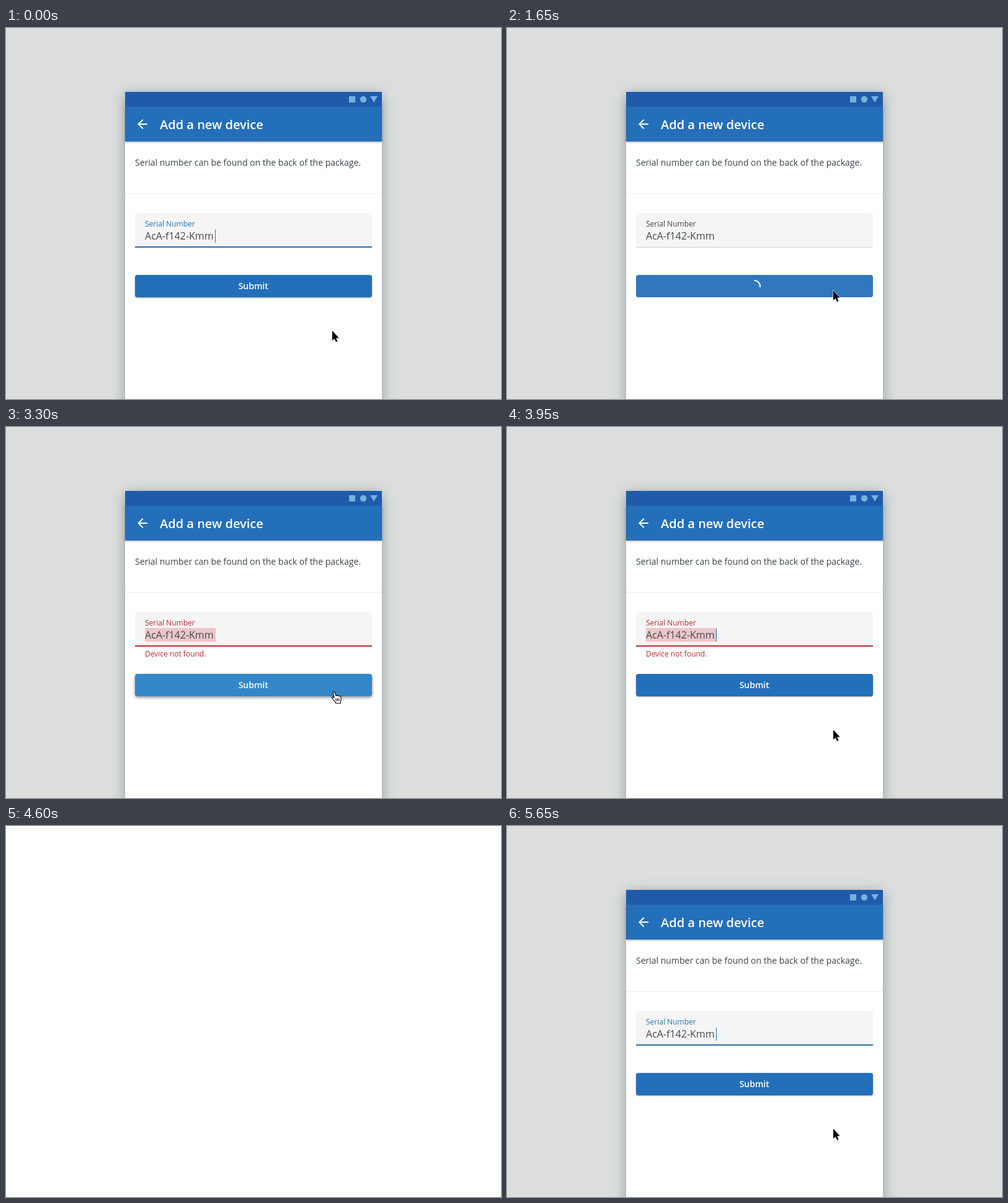
Animation, 798 px wide and 598 px high, one loop 5.7 s. Source, as an HTML page with a canvas:

```html
<!DOCTYPE html>
<html lang="en">
<head>
<meta charset="utf-8">
<title>Add a new device</title>
<style>
  html, body { margin: 0; width: 100%; height: 100%; overflow: hidden; background: #fff; }
  canvas { display: block; width: 798px; height: 598px; }
</style>
</head>
<body>
<canvas id="stage" width="798" height="598"></canvas>
<script>
const W = 798, H = 598, LOOP = 5700, STEP = 50;
const ctx = document.getElementById('stage').getContext('2d');

const BLUE = '#246fba', RED = '#bd2a30', INK = '#3b4449';
const BUSY_FROM = 1300, BUSY_TO = 2900;
const ICON_BACK = new Path2D('M20 11H7.83l5.59-5.59L12 4l-8 8 8 8 1.41-1.41L7.83 13H20z');
const ARROW = new Path2D('M0 0V16L3.6 12.7 6 18.3 8.5 17.2 6.2 11.8 10.6 11.4Z');
const HAND = new Path2D('M3.2 2.2C2.9.7 5.2 0 5.9 1.6L7.6 7.2C8 6 10 6.1 10.3 7.4' +
  'C10.9 6.4 12.6 6.7 12.9 8C13.7 7.3 15.3 7.9 15.5 9.2C16.2 11.6 16.2 13.3 15.3 15.4' +
  'L14.8 19.2H7.2L6.7 17.5C5 15.6 3.9 14.3 2.6 12.4C1.8 11.2.5 10.6.9 9.6' +
  'C1.6 8.4 3.3 9 4.7 10.6Z');

const clamp = x => Math.min(1, Math.max(0, x));
const ramp = (t, a, b) => clamp((t - a) / (b - a));
const smooth = x => x * x * (3 - 2 * x);
const ease = (t, a, b) => smooth(ramp(t, a, b));
const mix = (a, b, k) => a + (b - a) * k;
const mixRgb = (a, b, k) => `rgb(${a.map((v, i) => Math.round(mix(v, b[i], k)))})`;

function box(x, y, w, h, fill, radius = 0) {
  ctx.fillStyle = fill;
  ctx.beginPath();
  ctx.roundRect(x, y, w, h, radius);
  ctx.fill();
}

function text(str, x, y, size, fill, weight = 400, align = 'left') {
  ctx.font = `${weight} ${size}px "Open Sans", sans-serif`;
  ctx.textAlign = align;
  ctx.fillStyle = fill;
  ctx.fillText(str, x, y);
}

function withShadow(color, blur, dy, draw) {
  ctx.save();
  ctx.shadowColor = color;
  ctx.shadowBlur = blur;
  ctx.shadowOffsetY = dy;
  draw();
  ctx.restore();
}

function drawCard() {
  box(0, 0, W, H, '#dddfde');
  withShadow('rgba(60,85,95,.5)', 20, 4, () => box(192, 103, 414, 540, '#fff'));
  withShadow('rgba(0,0,0,.35)', 3, 1, () => box(192, 127, 414, 56, BLUE));
  ctx.save();
  ctx.beginPath();
  ctx.rect(192, 103, 414, 495);
  ctx.clip();
  box(192, 103, 414, 24, '#205bab');
  ctx.restore();

  box(553, 110, 10, 10, '#73b3de');
  ctx.beginPath();
  ctx.arc(576, 115, 5.2, 0, 7);
  ctx.moveTo(587, 110);
  ctx.lineTo(599, 110);
  ctx.lineTo(593, 120);
  ctx.fill();

  ctx.save();
  ctx.translate(208, 143);
  ctx.fillStyle = '#fff';
  ctx.fill(ICON_BACK);
  ctx.restore();

  text('Add a new device', 248, 163, 20, '#fff', 600);
  text('Serial number can be found on the back of the package.', 208, 222, 14, INK);
  box(192, 266, 414, 1, '#ececec');
}

function drawField(t, busy, failed) {
  const accent = failed ? RED : '#1b77b8';
  box(208, 298, 382, 56, '#f5f5f5', [4, 4, 0, 0]);
  if (busy) box(208, 353, 382, 1, '#cfd1d2');
  else box(208, 352, 382, 2, failed ? RED : BLUE);

  if (failed) box(224, 324, 114, 22, '#ebc7c9');
  text('Serial Number', 224, 320, 12, busy ? INK : accent);
  text('AcA-f142-Kmm', 224, 341, 16, '#434a4f');
  if (failed) text('Device not found.', 224, 370, 12, RED);

  const blinkOn = (t + 450) % 1000 < 500 || t >= 5000;
  if (!busy && blinkOn) box(337, 325, 1, 21, '#1b77b8');
}

function drawSpinner(t) {
  const p = ((t - 1360) / 1440 + 1) % 1;
  const grow = smooth(clamp(p * 2)), slide = smooth(clamp(p * 2 - 1));
  const start = 15 * grow + 110 * slide;
  const end = Math.min(126, start + 1 + 99 * grow);
  const angle = u => Math.PI + (p + u / 126) * Math.PI * 2;
  ctx.strokeStyle = '#fff';
  ctx.lineWidth = 2;
  ctx.beginPath();
  ctx.arc(399, 416, 9, angle(start), angle(end));
  ctx.stroke();
}

function drawButton(t, busy) {
  const hover = t < 2000
    ? ease(t, 480, 630) - ease(t, 1200, 1350)
    : ease(t, 2900, 3050) - ease(t, 3350, 3500);
  const fill = mixRgb([36, 111, 186], [51, 135, 200], hover);
  const paint = () => box(208, 398, 382, 36, fill, 4);
  if (busy) paint();
  else withShadow(`rgba(0,0,0,${mix(.4, .45, hover)})`, mix(2, 5, hover), mix(1, 2, hover), paint);

  const ripple = ease(t, 1150, 1500);
  const rippleAlpha = .16 * (1 - ramp(t, 1400, 1800));
  if (ripple > 0 && rippleAlpha > 0) {
    ctx.save();
    ctx.beginPath();
    ctx.roundRect(208, 398, 382, 36, 4);
    ctx.clip();
    ctx.fillStyle = `rgba(255,255,255,${rippleAlpha})`;
    ctx.beginPath();
    ctx.arc(528, 424, 325 * ripple, 0, 7);
    ctx.fill();
    ctx.restore();
  }

  if (busy) drawSpinner(t);
  else text('Submit', 398.7, 421, 14, '#fff', 600, 'center');
}

function drawPointer(t, busy) {
  const y = 488 - 65 * (ease(t, 200, 600) - ease(t, 3250, 3650));
  const hand = y < 434 && !busy;
  ctx.save();
  ctx.lineJoin = 'round';
  if (hand) {
    ctx.translate(524.3, y + .3);
    ctx.fillStyle = '#fff';
    ctx.fill(HAND);
    ctx.strokeStyle = '#000';
    ctx.lineWidth = 1.1;
    ctx.stroke(HAND);
    ctx.beginPath();
    for (const x of [7.8, 10.2, 12.6]) {
      ctx.moveTo(x, 11.3);
      ctx.lineTo(x, 15.6);
    }
    ctx.stroke();
  } else {
    ctx.translate(526, y);
    ctx.strokeStyle = 'rgba(255,255,255,.8)';
    ctx.lineWidth = 1.4;
    ctx.stroke(ARROW);
    ctx.fillStyle = '#000';
    ctx.fill(ARROW);
  }
  ctx.restore();
}

function draw(t) {
  const busy = t >= BUSY_FROM && t < BUSY_TO;
  const failed = t >= BUSY_TO && t < 5000;
  drawCard();
  drawField(t, busy, failed);
  drawButton(t, busy);
  drawPointer(t, busy);
  const veil = ease(t, 4365, 4590) - ease(t, 5460, 5655);
  if (veil > 0) box(0, 0, W, H, `rgba(255,255,255,${veil})`);
}

const begin = performance.now();
function tick() {
  const t = (performance.now() - begin) % LOOP;
  draw(Math.floor(t / STEP) * STEP);
  requestAnimationFrame(tick);
}
tick();
</script>
</body>
</html>
```
